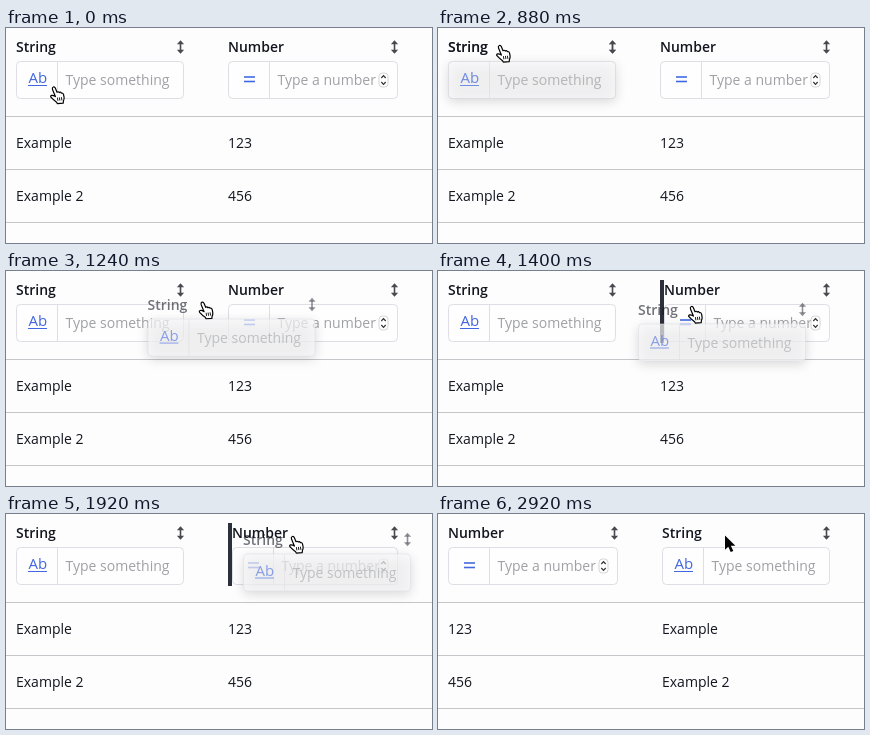
Recreate the animation shown at these times as an HTML page with a canvas. Size 426 by 215 pixels, loop 5.4 s.

```html
<!DOCTYPE html>
<html lang="en">
<head>
<meta charset="utf-8">
<title>Column reordering</title>
<style>
  html, body { margin: 0; width: 100%; height: 100%; overflow: hidden; background: #fdfdfe; }
  canvas { display: block; width: 426px; height: 215px; }
</style>
</head>
<body>
<canvas id="stage"></canvas>
<script>
const W = 426, H = 215, LOOP = 5400, STEP = 40;
const DRAG = 880, DROP = 2800, SWAP = 2840, RELEASE = 2920;
const FONT = '14px "Open Sans", sans-serif';
const BLUE = '#4267e0', INK = '#14161f', HINT = '#a0a1a5', EDGE = '#dedee4';

const canvas = document.getElementById('stage');
const ctx = canvas.getContext('2d');
const ratio = window.devicePixelRatio || 1;
canvas.width = W * ratio;
canvas.height = H * ratio;

const columns = {
  string: { title: 'String', hint: 'Type something', width: 168, cells: ['Example', 'Example 2'] },
  number: { title: 'Number', hint: 'Type a number', width: 170, cells: ['123', '456'] }
};

// Keys: time, x, y
const handPath = [
  [0, 44, 58], [520, 52, 18], [680, 58, 16.5], [880, 58, 16.5],
  [1040, 104, 21], [1400, 250, 34.5], [1600, 276, 33], [1920, 283, 21.5]
];
const ghostPath = [
  [880, 0, 0], [1040, 44, 4.5], [1400, 190, 19.5], [1600, 219, 16.5], [1920, 227, 6.5]
];

// Monotone cubic interpolation, so that holds stay still and peaks do not overshoot
function along(keys, t, axis) {
  const last = keys.length - 1;
  if (t <= keys[0][0]) return keys[0][axis];
  if (t >= keys[last][0]) return keys[last][axis];
  const i = keys.findIndex((k, n) => n < last && t < keys[n + 1][0]);
  const slope = n => (keys[n + 1][axis] - keys[n][axis]) / (keys[n + 1][0] - keys[n][0]);
  const tangent = n => {
    if (n === 0) return slope(0);
    if (n === last) return 0;
    const a = slope(n - 1), b = slope(n);
    return a * b > 0 ? 2 * a * b / (a + b) : 0;
  };
  const span = keys[i + 1][0] - keys[i][0];
  const u = (t - keys[i][0]) / span, u2 = u * u, u3 = u2 * u;
  return (2 * u3 - 3 * u2 + 1) * keys[i][axis] + (u3 - 2 * u2 + u) * span * tangent(i) +
    (3 * u2 - 2 * u3) * keys[i + 1][axis] + (u3 - u2) * span * tangent(i + 1);
}

const at = (keys, t) => ({ x: along(keys, t, 1), y: along(keys, t, 2) });

function text(str, x, y, color, weight = 400) {
  ctx.font = `${weight} ${FONT}`;
  ctx.fillStyle = color;
  ctx.fillText(str, x, y);
}

function line(color, width, ...points) {
  ctx.strokeStyle = color;
  ctx.lineWidth = width;
  ctx.beginPath();
  points.forEach(([x, y]) => ctx.lineTo(x, y));
  ctx.stroke();
}

function roundBox(x, y, w, h, r) {
  ctx.beginPath();
  ctx.roundRect(x, y, w, h, r);
}

function sortArrow(x, y) {
  ctx.fillStyle = '#484a50';
  for (const dir of [-1, 1]) {
    ctx.beginPath();
    ctx.moveTo(x, y + 6.7 * dir);
    ctx.lineTo(x - 3.6, y + 2.8 * dir);
    ctx.lineTo(x + 3.6, y + 2.8 * dir);
    ctx.fill();
  }
  ctx.fillRect(x - 0.8, y - 4, 1.6, 8);
}

function stepper(x, y) {
  roundBox(x - 4.5, y - 7, 9, 14, 3.5);
  ctx.fillStyle = '#fff';
  ctx.fill();
  ctx.strokeStyle = '#c9c9cc';
  ctx.lineWidth = 0.8;
  ctx.stroke();
  for (const dir of [-1, 1]) {
    line('#333', 1.2, [x - 2.2, y + 2 * dir], [x, y + 4.4 * dir], [x + 2.2, y + 2 * dir]);
  }
}

function icon(kind, x) {
  if (kind === 'string') {
    ctx.font = '400 15px "Open Sans", sans-serif';
    ctx.fillStyle = BLUE;
    ctx.fillText('Ab', x - 9, 55);
    line(BLUE, 1, [x - 9.5, 57.5], [x + 9.5, 57.5]);
  } else {
    line(BLUE, 1.6, [x - 5.5, 49], [x + 5.5, 49]);
    line(BLUE, 1.6, [x - 5.5, 53.5], [x + 5.5, 53.5]);
  }
}

function inputFrame(x, width) {
  roundBox(x + 0.5, 33.5, width - 1, 37, 4);
}

function header(kind, x, width, ghost) {
  const col = columns[kind];
  text(col.title, x, 24, INK, 600);
  sortArrow(x + width - 3.5, 19);
  inputFrame(x, width);
  if (!ghost) {
    ctx.fillStyle = '#fefeff';
    ctx.fill();
  }
  ctx.strokeStyle = EDGE;
  ctx.lineWidth = 1;
  ctx.stroke();
  line(EDGE, 1, [x + 41.5, 34], [x + 41.5, 70]);
  icon(kind, x + 21.5);
  text(col.hint, x + 49.5, 57, HINT);
  if (kind === 'number') stepper(x + width - 14.5, 52);
}

function column(kind, x, marked) {
  const col = columns[kind], inset = marked ? 4 : 0;
  header(kind, x + inset, col.width - inset);
  col.cells.forEach((cell, i) => text(cell, x, 120 + 53 * i, INK));
  if (marked) {
    ctx.fillStyle = '#2c303b';
    ctx.fillRect(x, 9, 4, 63);
  }
}

function ghost(t) {
  const { x, y } = at(ghostPath, t);
  ctx.save();
  ctx.translate(x, y);
  ctx.save();
  ctx.globalAlpha = 0.7;
  ctx.shadowColor = 'rgba(0, 0, 0, .22)';
  ctx.shadowBlur = 12 * ratio;
  ctx.shadowOffsetY = 3 * ratio;
  inputFrame(10, columns.string.width);
  ctx.fillStyle = '#fafafb';
  ctx.fill();
  ctx.restore();
  ctx.globalAlpha = 0.6;
  header('string', 10, columns.string.width, true);
  ctx.restore();
}

const handShape = new Path2D(
  'M5.4 10.6 L2.5 3.6 Q1.9 1.5 3.3 1 Q4.7 .6 5.4 2.3 L7 6.2 Q8.2 5.2 9.2 6.5 ' +
  'Q10.5 5.6 11.4 7.1 Q12.9 6.6 13.5 8.4 L14.1 11.4 Q14.3 13.4 13.4 15 L13.2 17.2 ' +
  'L7.3 17.6 L6.6 16.2 Q3.6 14.2 .9 11.2 Q.2 9.9 1.5 9.4 Q2.9 9 5.4 10.6 Z');
const arrowShape = new Path2D(
  'M0 0 L0 14.2 L3.3 11.2 L5.7 16.6 L8.3 15.4 L5.9 10.2 L10.4 10.2 Z');

function hand({ x, y }) {
  ctx.save();
  ctx.translate(x, y);
  ctx.fillStyle = '#fff';
  ctx.fill(handShape);
  ctx.strokeStyle = '#000';
  ctx.lineWidth = 1.2;
  ctx.lineJoin = 'round';
  ctx.stroke(handShape);
  for (const n of [0, 1, 2]) {
    line('#000', 0.9, [7.4 + 2 * n, 11.6 - 0.2 * n], [7.9 + 2 * n, 14.8 - 0.2 * n]);
  }
  ctx.restore();
}

function arrow(x, y) {
  ctx.save();
  ctx.translate(x, y);
  ctx.lineJoin = 'round';
  ctx.strokeStyle = '#fff';
  ctx.lineWidth = 2;
  ctx.stroke(arrowShape);
  ctx.fillStyle = '#000';
  ctx.fill(arrowShape);
  ctx.restore();
}

function draw(t) {
  ctx.setTransform(ratio, 0, 0, ratio, 0, 0);
  ctx.fillStyle = '#fdfdfe';
  ctx.fillRect(0, 0, W, H);
  for (const y of [88.5, 141.5, 194.5]) line('#c6c6ca', 1, [0, y], [W, y]);

  const pointer = at(handPath, t);
  const dragging = t >= DRAG && t < DROP;
  const order = t < SWAP ? ['string', 'number'] : ['number', 'string'];
  const second = 54 + columns[order[0]].width;
  column(order[0], 10, false);
  column(order[1], second, dragging && pointer.x + 4 >= second);
  if (dragging) ghost(t);

  if (t < RELEASE) hand(pointer);
  else arrow(287, 21.5);
}

function tick(now) {
  draw(Math.floor(now % LOOP / STEP) * STEP);
  requestAnimationFrame(tick);
}
requestAnimationFrame(tick);
</script>
</body>
</html>
```
